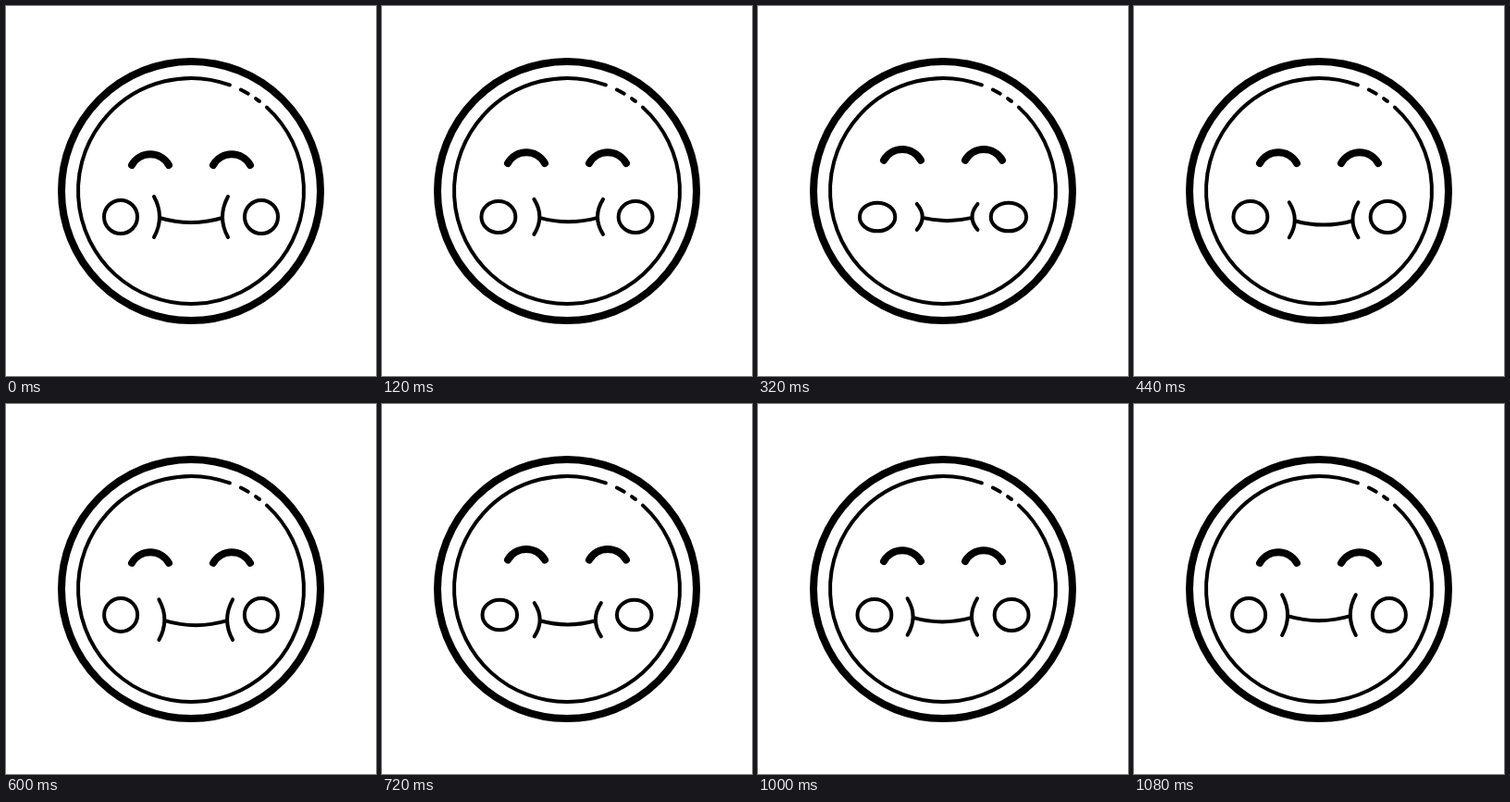
Animation, 400 px wide and 400 px high, one loop 1120 ms. Source, as an HTML page:

```html
<!DOCTYPE html>
<html lang="en">
<head>
<meta charset="utf-8">
<title>Chewing face</title>
<style>
  html, body { margin: 0; width: 100%; height: 100%; overflow: hidden; background: #fff; }
  svg { display: block; width: 100%; height: 100%; }
</style>
</head>
<body>
<svg viewBox="0 0 400 400" fill="none" stroke="#000" stroke-width="4" stroke-linecap="round">
  <circle cx="200" cy="200" r="140" stroke-width="8"/>
  <circle cx="200" cy="200" r="122" pathLength="360" transform="rotate(-47.8 200 200)"
    stroke-dasharray="337.9 6.1 4.2 4.6 2.3 4.9"/>
  <path id="eyes" stroke-width="8" d="M136 172A23 23 0 0 1 176 172M224 172A23 23 0 0 1 264 172"/>
  <ellipse class="cheek" cy="228"/>
  <ellipse class="cheek" cy="228"/>
  <path id="mouth"/>
</svg>
<script>
const LOOP = 1120, STEP = 40;

// Mouth centre and half size, and cheek lift, at each quarter of the loop.
const poses = [
  { x: 200, y: 228, w: 34, h: 22, lift: 0 },
  { x: 204.6, y: 227.8, w: 26.7, h: 13.8, lift: 1 },
  { x: 205.4, y: 233.2, w: 34, h: 22, lift: 0 },
  { x: 198.1, y: 233.3, w: 27.8, h: 15.8, lift: 1 },
];

const ease = s => s * s * s * (10 - 15 * s + 6 * s * s);

function poseAt(t) {
  const q = t / LOOP * poses.length, i = Math.floor(q), k = ease(q - i);
  const from = poses[i], to = poses[(i + 1) % poses.length], pose = {};
  for (const name in from) pose[name] = from[name] + (to[name] - from[name]) * k;
  return pose;
}

const eyes = document.getElementById("eyes");
const mouth = document.getElementById("mouth");
const cheeks = document.querySelectorAll(".cheek");

function draw(t) {
  const { x, y, w, h, lift } = poseAt(t);
  eyes.setAttribute("transform", `translate(0 ${-5.4 * lift})`);

  cheeks.forEach((cheek, i) => {
    const side = i ? 1 : -1;
    cheek.setAttribute("cx", 200 + side * (76 - 5.2 * lift));
    cheek.setAttribute("rx", 18 + 1.2 * lift);
    cheek.setAttribute("ry", 18 - 2.7 * lift);
  });

  const bracket = side =>
    `M${x + side * (w + 6)} ${y - h}Q${x + side * (w - 6)} ${y} ${x + side * (w + 6)} ${y + h}`;
  mouth.setAttribute("d", bracket(-1) + bracket(1) +
    `M${x - w} ${y + 1}Q${x} ${y + 1 + h * .46} ${x + w} ${y + 1}`);
}

const start = performance.now();
function frame() {
  const t = (performance.now() - start) % LOOP;
  draw(Math.floor(t / STEP) * STEP);
  requestAnimationFrame(frame);
}
frame();
</script>
</body>
</html>
```
